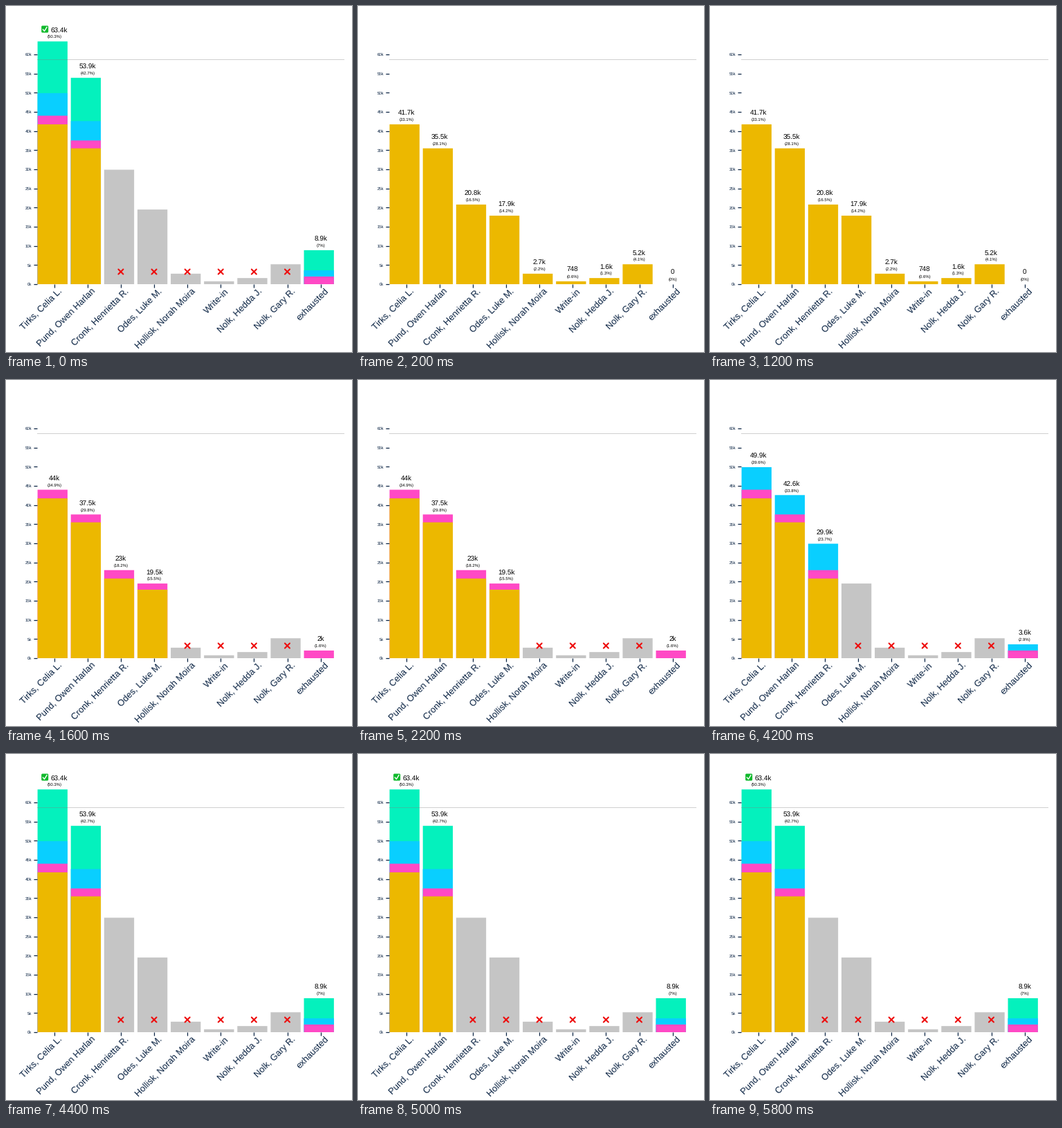
Animation, 500 px wide and 500 px high, one loop 6 s. Source, as a matplotlib script:

```python
import matplotlib.pyplot as plt
from matplotlib.animation import FuncAnimation
from matplotlib.patches import FancyBboxPatch, Rectangle

plt.rcParams["font.family"] = "Liberation Sans"
plt.rcParams["text.hinting"] = "none"
plt.rcParams["text.hinting_factor"] = 1

DPI = 100
NAVY = "#0a2343"
GREY = "#c5c5c5"
ROUND_COLORS = ["#ecb800", "#ff49c5", "#09cfff", "#04f1bd"]
BASE, PX_PER_K = 402, 5.533
LEFT, STEP, BAR = 45.6, 48.12, 43.3
TOTAL, MAJORITY = 126.1, 58.7

# Running totals in thousands; a short list means an early elimination.
VOTES = {
    "Tirks, Celia L.": [41.74, 44, 49.9, 63.4],
    "Pund, Owen Harlan": [35.48, 37.54, 42.6, 53.9],
    "Cronk, Henrietta R.": [20.8, 23, 29.9],
    "Odes, Luke M.": [17.9, 19.5],
    "Hollisk, Norah Moira": [2.74],
    "Write-in": [0.748],
    "Nolk, Hedda J.": [1.6],
    "Nolk, Gary R.": [5.2],
    "exhausted": [0, 2, 3.62, 8.88],
}

fig = plt.figure(figsize=(5, 5), dpi=DPI, facecolor="white")
ax = fig.add_axes([0, 0, 1, 1])
ax.set_xlim(0, 500)
ax.set_ylim(500, 0)
ax.axis("off")


def y_of(k):
    return BASE - k * PX_PER_K


def label(x, y, s, px, color="black", **kw):
    kw.setdefault("ha", "center")
    return ax.text(x, y, s, fontsize=px * 72 / DPI, color=color,
                   va="baseline", zorder=5, **kw)


def stroke(xs, ys, color, px, **kw):
    kw.setdefault("zorder", 4)
    return ax.plot(xs, ys, color=color, lw=px * 72 / DPI, **kw)[0]


def count(k):
    return f"{round(k, 1):g}k" if k >= 1 else f"{k * 1000:.0f}"


def percent(k):
    return f"({round(100 * k / TOTAL, 1):g}%)"


def cross(x, y=384, r=3.5):
    return [stroke([x - r, x + r], [y - s * r, y + s * r], "#ee0a0a", 2.1,
                   solid_capstyle="round") for s in (1, -1)]


def check_box(x, y, size=10):
    box = FancyBboxPatch((x + 1.5, y + 1.5), size - 3, size - 3,
                         boxstyle="round,pad=1.5", fc="#0fb92c", lw=0, zorder=4)
    ax.add_patch(box)
    tick = stroke([x + 2.2, x + 4.3, x + 7.8], [y + 5.4, y + 7.8, y + 2.1],
                  "white", 1.4, zorder=5)
    return [box, tick]


def bar(i, k, color):
    top = y_of(k)
    return ax.add_patch(Rectangle((LEFT + i * STEP, top), BAR, BASE - top,
                                  fc=color, lw=0, snap=False, zorder=2))


def column(i, totals, rnd):
    mid = LEFT + (i + 0.5) * STEP
    if rnd >= len(totals):
        return [bar(i, totals[-1], GREY), *cross(mid)]

    # Later rounds go underneath, so each bar can start at the baseline.
    parts = [bar(i, totals[r], ROUND_COLORS[r]) for r in range(rnd, -1, -1)]
    k = totals[rnd]
    top = y_of(k)
    if k > MAJORITY:
        parts += check_box(51.2, top - 22.7)
        parts.append(label(64, top - 13.6, count(k), 10, ha="left"))
    else:
        parts.append(label(mid, top - 13.6, count(k), 10))
    parts.append(label(mid, top - 5, percent(k), 6.4))
    return parts


def draw_axes():
    for k in range(0, 61, 5):
        y = y_of(k)
        stroke([40, 45.4], [y, y], NAVY, 1.25, solid_capstyle="butt")
        label(37.3, y + 2.2, f"{k}k", 6.25, NAVY, ha="right")
    for i, name in enumerate(VOTES):
        mid = LEFT + (i + 0.5) * STEP
        stroke([mid, mid], [402, 407], NAVY, 1.25, solid_capstyle="butt")
        label(mid + 12.6, 412.8, name, 12.5, NAVY, ha="right",
              rotation=45, rotation_mode="anchor")
    y = y_of(MAJORITY)
    stroke([45, 488], [y, y], "#808080", 1, alpha=0.37, zorder=3)


draw_axes()
rounds = [[part for i, totals in enumerate(VOTES.values())
           for part in column(i, totals, rnd)] for rnd in range(4)]


def update(n):
    # The loop opens on the last round, then shows each for seven steps.
    current = min((n - 1) // 7, 3) % 4
    for rnd, parts in enumerate(rounds):
        for part in parts:
            part.set_visible(rnd == current)
    return rounds[current]


anim = FuncAnimation(fig, update, frames=30, interval=200,
                     repeat=True, repeat_delay=0)
plt.show()
```
